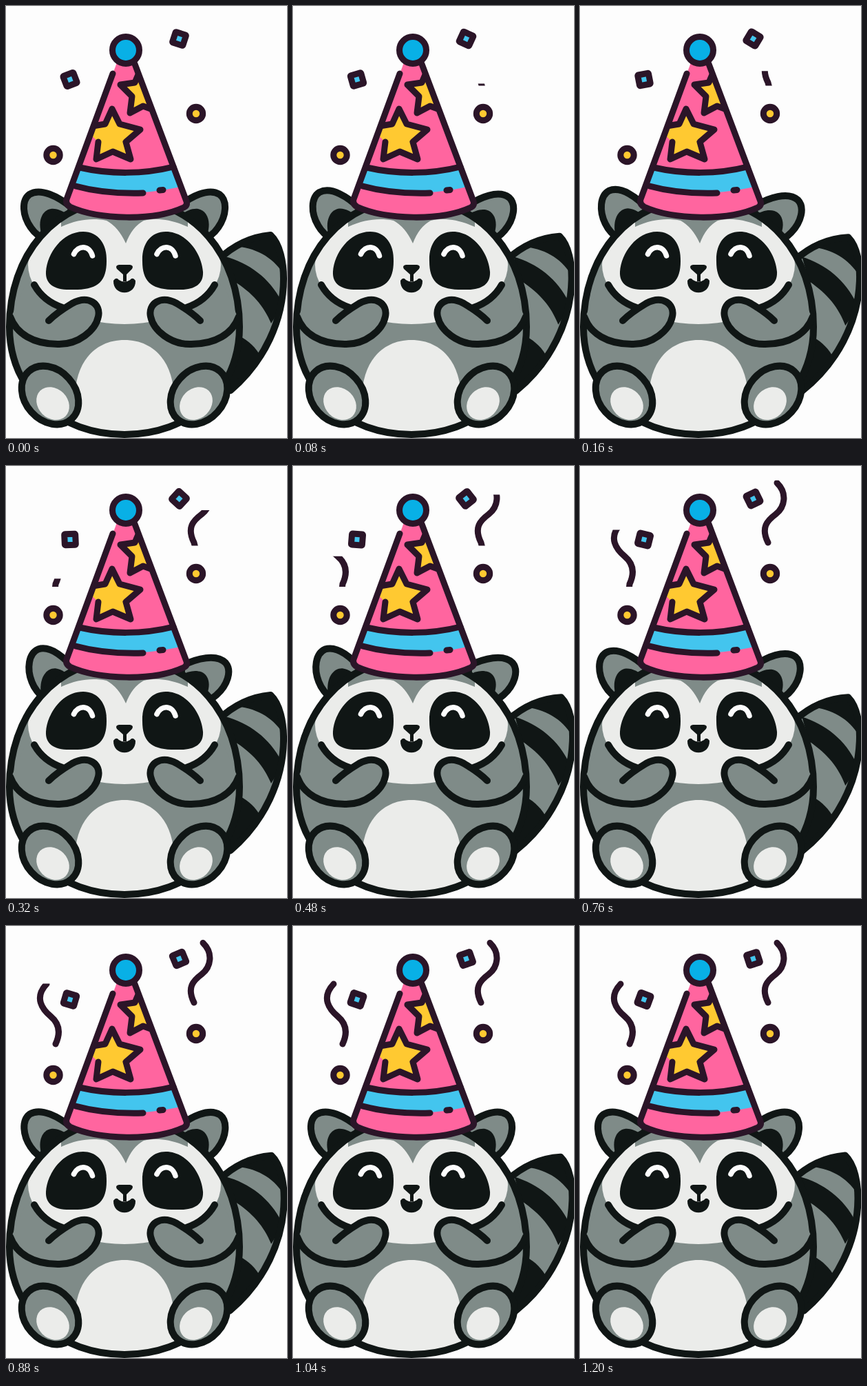
Recreate the animation shown at these times as an HTML page. Size 408 by 626 pixels, loop 1240 ms.

```html
<!DOCTYPE html>
<html lang="en">
<head>
<meta charset="utf-8">
<title>Party raccoon</title>
<style>
  html, body { margin: 0; width: 100%; height: 100%; overflow: hidden; background: #fdfdfd; }
  svg { display: block; width: 408px; height: 626px; }
  .ink { stroke: #101615; stroke-width: 10; stroke-linecap: round; stroke-linejoin: round; }
  .plum { stroke: #2b1528; stroke-width: 9; stroke-linecap: round; stroke-linejoin: round; }
  .line { fill: none; }
  .gray { fill: #7f8b88; }
  .dark { fill: #101615; }
  .pale { fill: #ebecea; }
  .pink { fill: #ff659f; }
  .sky { fill: #43c5ee; }
  .blue { fill: #08b0e6; }
  .gold { fill: #ffc931; }
</style>
</head>
<body>
<svg viewBox="0 0 408 626">
  <defs>
    <path id="egg" d="M172 280C70 280 5 362 5 465C5 560 80 621 172 621S339 560 339 465C339 362 274 280 172 280Z"/>
    <path id="tailShape" d="M308 368C335 342 362 334 384 332C398 345 403 372 403 395C403 455 375 515 326 557L300 540Z"/>
    <path id="cone" d="M161 82L88 280Q86 287 93 291C135 310 215 312 258 292Q264 289 262 283L186 82Z"/>
    <clipPath id="inEgg"><use href="#egg"/></clipPath>
    <clipPath id="inTail"><use href="#tailShape"/></clipPath>
    <clipPath id="inCone"><use href="#cone"/></clipPath>
    <clipPath id="wipeL"><rect x="30" width="70"/></clipPath>
    <clipPath id="wipeR"><rect x="250" width="70"/></clipPath>

    <g id="ear">
      <path class="ink gray" d="M62 342C50 336 42 330 36 321C24 304 22 282 34 273C50 263 76 276 95 292L88 325Z"/>
      <path class="dark" d="M52 332C45 311 53 296 65 294C74 293 84 297 92 305L75 335Z"/>
    </g>
    <path id="eye" class="dark" d="M112 327C134 327 147 345 146 370C146 398 134 410 104 411H96C70 412 57 403 58 385C60 358 82 327 112 327Z"/>
    <path id="glint" class="line" d="M98.5 359.5C105 346 121 346 125.5 362" stroke="#fdfdfd" stroke-width="7.5" stroke-linecap="round"/>
    <g id="arm">
      <path class="gray" d="M41 404C50 422 64 431 84 437L96 431C120 418 138 432 134 450C130 470 105 491 75 490C40 490 15 475 8 450L28 404Z"/>
      <path class="ink line" d="M41 404C50 420 64 431 82 437M62 456C72 446 86 437 96 431C120 418 138 432 134 450C130 470 105 491 75 490C40 490 15 475 6 450"/>
    </g>
    <g id="foot">
      <ellipse class="ink gray" rx="46.5" ry="36.5" transform="translate(64 564) rotate(48)"/>
      <ellipse class="pale" rx="26" ry="21.5" transform="translate(68 576) rotate(45)"/>
    </g>
    <rect id="chip" class="plum" x="-8" y="-8" width="16" height="16" rx="1" fill="#43c5ee"/>
  </defs>

  <rect width="408" height="626" fill="#fdfdfd"/>

  <g id="tail">
    <use href="#tailShape" class="gray"/>
    <g class="dark" clip-path="url(#inTail)">
      <path d="M330 348C362 350 386 363 402 387L412 340L380 322Z"/>
      <path d="M318 363C352 372 383 394 400 428C394 446 390 452 385 460C374 434 358 416 330 398Z"/>
      <path d="M334 476C348 482 359 491 367 503L326 565L310 540Z"/>
    </g>
    <use href="#tailShape" class="ink line"/>
  </g>

  <g id="earL"><use href="#ear"/></g>
  <g id="earR"><use href="#ear" transform="matrix(-1 0 0 1 344 0)"/></g>

  <use href="#egg" class="gray"/>
  <g clip-path="url(#inEgg)">
    <ellipse class="pale" cx="172" cy="375" rx="140" ry="86"/>
    <path class="gray" d="M80 320C105 309 125 307 146 311Q163 320 174 344Q183 320 200 311C219 307 239 309 264 320V285H80Z"/>
    <path class="pale" d="M100 570C100 515 130 484 172 484S244 515 244 570V626H100Z"/>
  </g>
  <use href="#egg" class="ink line"/>

  <use href="#eye"/>
  <use href="#eye" transform="matrix(-1 0 0 1 344 0)"/>
  <use href="#glint"/>
  <use href="#glint" x="120.5"/>
  <path class="dark" d="M164 375H180Q186 376 183 381L175 389V399H170V389L161 381Q158 376 164 375Z"/>
  <path class="dark" d="M156 398Q160 392 164 397Q172 402 180 397Q184 392 188 398C189 421 155 421 156 398Z"/>

  <use href="#arm"/>
  <use href="#arm" transform="matrix(-1 0 0 1 344 0)"/>
  <use href="#foot"/>
  <use href="#foot" transform="matrix(-1 0 0 1 344 0)"/>

  <use href="#cone" class="pink"/>
  <g clip-path="url(#inCone)">
    <path class="sky" d="M104 234C150 244 200 244 246 232L256 261C210 273 150 275 96 260Z"/>
    <path class="gold" d="M112 176L144 171L154 149L165 171L195 179L174 197L181 222L155 211L131 222L134 197Z"/>
    <path class="gold" d="M192 99L187 111L166 114L183 131L180 155L199 145L213 150Z"/>
    <g class="plum line">
      <path d="M120 175L144 171L154 149L165 171L195 179L174 197L181 222L155 211L131 222L134 197"/>
      <path d="M193 97L187 111L166 114L183 131L180 155L199 145L210 149"/>
    </g>
  </g>
  <g class="plum line">
    <path d="M107 234C150 244 200 244 243 233M101 261C130 269 165 272 199 271M223 267L228 266.5"/>
    <path d="M155 98L88 280Q86 287 93 291C135 310 215 312 258 292Q264 289 262 283L187 84"/>
  </g>
  <circle class="plum blue" cx="174" cy="64" r="19.5"/>

  <g class="plum gold">
    <circle cx="68.5" cy="216" r="9.7"/>
    <circle cx="276" cy="156" r="9.7"/>
  </g>
  <use id="chipL" href="#chip"/>
  <use id="chipR" href="#chip"/>
  <g clip-path="url(#wipeL)"><path id="ribbonL" class="plum line"/></g>
  <g clip-path="url(#wipeR)"><path id="ribbonR" class="plum line"/></g>
</svg>
<script>
  const LOOP = 1240, STEP = 40;
  const $ = s => document.querySelector(s);
  const clamp = x => Math.min(1, Math.max(0, x));
  const easeOut = x => 1 - (1 - clamp(x)) ** 2;
  const swing = x => (1 - Math.cos(Math.PI * x)) / 2;
  const pose = (id, value) => $(id).setAttribute("transform", value);

  const ribbons = [
    { side: "L", start: 270, low: 175, high: 78, lead: "M71 180L",
      curve: "72 171C80 154 77 141 65 131C53 121 40 104 59 84" },
    { side: "R", start: 67, low: 115.5, high: 19, lead: "M275 119L",
      curve: "273 111C262 89 272 79 284 70C298 59 301 39 286 24.5" }
  ];

  function drawRibbon({ side, start, low, high, lead, curve }, t) {
    const top = low + (high - low) * easeOut((t - start) / 800);
    const open = t > start + 500; // the lower end turns from a flat cut to a round cap
    const rect = $("#wipe" + side + " rect");
    rect.setAttribute("y", top);
    rect.setAttribute("height", low - top + (open ? 4 : 0));
    $("#ribbon" + side).setAttribute("d", (open ? "M" : lead) + curve);
  }

  function draw(t) {
    const wag = swing(t / 155);
    pose("#tail", `rotate(${2.3 * wag} 305 470)`);

    const tilt = 14 * (t < 400 ? easeOut(t / 400) : 1 - swing(clamp((t - 400) / 560)));
    pose("#earL", `rotate(${tilt} 72 323)`);
    pose("#earR", `rotate(${tilt} 262 317)`);

    const spin = easeOut(t / LOOP);
    pose("#chipL", `translate(93 106.5) rotate(${-21 + 41 * spin})`);
    pose("#chipR", `translate(251.5 47.5) rotate(${18 + 54 * spin})`);

    ribbons.forEach(r => drawRibbon(r, t));
  }

  const begin = performance.now();
  function tick() {
    const t = (performance.now() - begin) % LOOP;
    draw(Math.floor(t / STEP) * STEP);
    requestAnimationFrame(tick);
  }
  tick();
</script>
</body>
</html>
```
